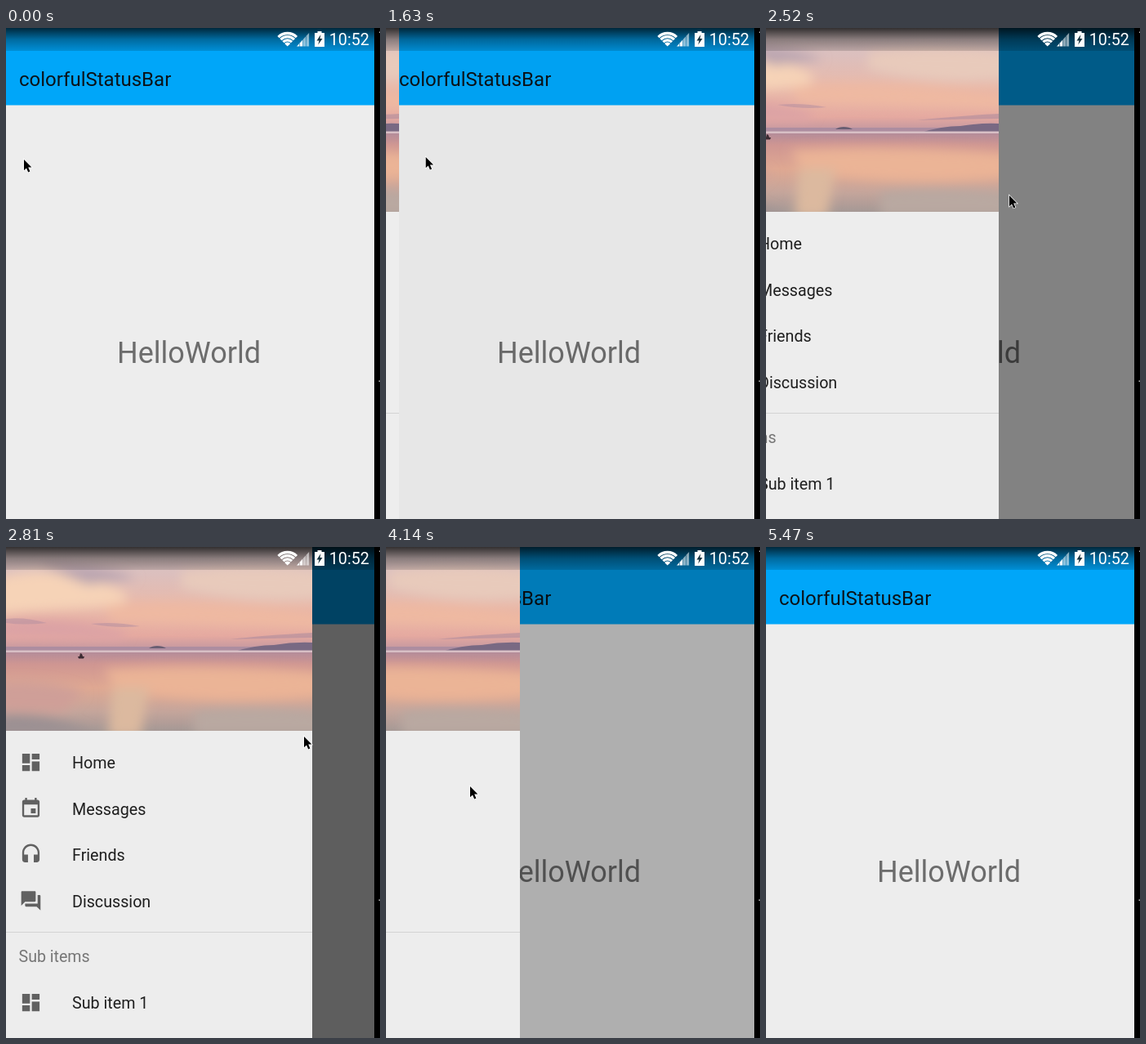
An HTML page that plays this animation: 458x601 px, repeating every 5660 ms.

```html
<!DOCTYPE html>
<html lang="en">
<head>
<meta charset="utf-8">
<title>Navigation drawer</title>
<style>
  html, body { margin: 0; width: 100%; height: 100%; overflow: hidden; background: #000; }
  svg { display: block; width: 100%; height: 100%; font-family: Roboto, "Noto Sans", sans-serif; }
</style>
</head>
<body>
<svg viewBox="0 0 458 601" xmlns="http://www.w3.org/2000/svg">
  <defs>
    <linearGradient id="status" x2="0" y2="1">
      <stop offset="0" stop-opacity=".76"/>
      <stop offset=".5" stop-opacity=".36"/>
      <stop offset="1" stop-opacity=".14"/>
    </linearGradient>
    <linearGradient id="sky" x2="0" y2="1">
      <stop offset="0" stop-color="#d5c5c7"/>
      <stop offset=".27" stop-color="#dcbfbd"/>
      <stop offset=".55" stop-color="#e8b9aa"/>
      <stop offset=".85" stop-color="#e5a9a0"/>
      <stop offset="1" stop-color="#bd94a0"/>
    </linearGradient>
    <linearGradient id="water" x2="0" y2="1">
      <stop offset="0" stop-color="#b48c99"/>
      <stop offset=".15" stop-color="#cf9692"/>
      <stop offset=".45" stop-color="#dfa892"/>
      <stop offset=".75" stop-color="#c5a59b"/>
      <stop offset="1" stop-color="#a59895"/>
    </linearGradient>
    <filter id="soft" x="-30%" y="-60%" width="160%" height="220%"><feGaussianBlur stdDeviation="7"/></filter>
    <clipPath id="photoClip"><rect width="375" height="225"/></clipPath>
    <clipPath id="screenClip"><rect width="451" height="601"/></clipPath>
    <path id="dashboard" d="M3 13h8V3H3zM3 21h8v-6H3zM13 21h8V11h-8zM13 3v6h8V3z"/>
    <path id="calendar" d="M17 12h-5v5h5zM16 1v2H8V1H6v2H5c-1.1 0-2 .9-2 2v14c0 1.1.9 2 2 2h14c1.1 0 2-.9 2-2V5c0-1.1-.9-2-2-2h-1V1zm3 18H5V8h14z"/>
    <path id="headset" d="M12 1c-5 0-9 4-9 9v7c0 1.7 1.3 3 3 3h3v-8H5v-2c0-3.9 3.1-7 7-7s7 3.1 7 7v2h-4v8h3c1.7 0 3-1.3 3-3v-7c0-5-4-9-9-9z"/>
    <path id="chat" d="M21 6h-2v9H6v2c0 .6.4 1 1 1h11l4 4V7c0-.6-.4-1-1-1zm-4 6V3c0-.6-.4-1-1-1H3c-.6 0-1 .4-1 1v14l4-4h10c.6 0 1-.4 1-1z"/>
  </defs>

  <g clip-path="url(#screenClip)">
    <rect width="451" height="601" fill="#ededed"/>
    <rect width="451" height="94.5" fill="#00a6f9"/>
    <text x="16" y="71" font-size="24" fill="#0b1319">colorfulStatusBar</text>
    <text x="136" y="410" font-size="36" fill="#6c6c6c">HelloWorld</text>
    <rect id="scrim" width="451" height="601"/>

    <g id="drawer">
      <rect width="375" height="601" fill="#ededed"/>
      <g clip-path="url(#photoClip)">
        <rect width="375" height="128" fill="url(#sky)"/>
        <g filter="url(#soft)">
          <path d="M-10 38Q50 20 120 45T90 75-10 84z" fill="#f6d3b7"/>
          <path d="M40 22Q120 20 160 38L100 46z" fill="#b9a4b0"/>
          <path d="M215 30Q300 20 390 30V62Q300 72 215 50z" fill="#e8cabb"/>
          <path d="M120 72Q240 64 390 82V100Q240 94 130 92z" fill="#efb9a1"/>
          <path d="M-10 92Q60 82 150 104L140 114-10 110z" fill="#dba2a5"/>
        </g>
        <path d="M0 88q22-3 50 5q-28 3-50 0zM104 94q30-3 60 3q-30 3-60-3z" fill="#b790a0" opacity=".55"/>
        <path d="M275 113q40-5 100-8v6q-55 1-100 2z" fill="#b08d9d" opacity=".6"/>
        <rect y="122" width="375" height="7" fill="#ad8da0"/>
        <path d="M280 128q25-8 48-8q24-4 47-3v12z" fill="#796983"/>
        <path d="M175 124q4-3 10-3q7 0 11 3z" fill="#695e72"/>
        <rect y="129" width="375" height="96" fill="url(#water)"/>
        <g filter="url(#soft)">
          <path d="M120 150Q250 142 390 155V182Q260 196 135 176z" fill="#ebb496"/>
          <path d="M130 172h45l-10 60h-40z" fill="#dcb99f"/>
          <path d="M-10 165Q50 160 95 178L70 202-10 200z" fill="#cf9f98"/>
          <path d="M-10 207Q50 200 110 230H-10z" fill="#9b9093"/>
          <path d="M230 202Q300 192 390 204V230H230z" fill="#b9a9a1"/>
        </g>
        <rect y="126.500" width="375" height="2.500" fill="#d8bfc5"/>
        <path d="M88 134h8l-1 2.500h-6zM90 134l1-4 2 1 1 3z" fill="#3b2b32"/>
      </g>
      <rect y="471" width="375" height="1" fill="#d3d3d3"/>
      <text x="15.500" y="508" font-size="19.600" fill="#767676">Sub items</text>
      <g id="items" font-size="19.700"></g>
    </g>

    <rect width="451" height="28" fill="url(#status)"/>
    <g fill="#fff">
      <g id="wifi" fill="none" stroke="#fff" stroke-width="3.300"></g>
      <g id="signal"></g>
      <path d="M381.500 4h5v2h3.500v17h-12V6h3.500z"/>
      <path d="M385.500 8l-5 7.500h3l-1.300 5 5.300-7.500h-3z" fill="#15323f"/>
      <text x="395.800" y="21" font-size="19.700">10:52</text>
    </g>
  </g>
  <path d="M456.500 431.500h1.500v1.500h-1.500zM457 4.500h1v1.500h-1z" fill="#bbb"/>
  <path id="cursor" d="M0 0V13.200L3 10.400 5.200 15.400 7.400 14.400 5.200 9.600H9.400z" stroke="#fff" stroke-width="1.400" paint-order="stroke"/>
</svg>

<script>
const LOOP = 5660, FIRST = 590, STEP = 147.9, DRAWER = 375;
const $ = id => document.getElementById(id);

const items = [
  ["dashboard", "Home", 264], ["calendar", "Messages", 320.5], ["headset", "Friends", 377],
  ["chat", "Discussion", 433.5], ["dashboard", "Sub item 1", 558]
];
$("items").innerHTML = items.map(([icon, label, y]) =>
  `<use href="#${icon}" transform="translate(16.300 ${y - 14.6}) scale(1.18)" fill="#616161"/>
   <text x="81" y="${y + 7}" fill="#1f1f1f">${label}</text>`).join("");

$("wifi").innerHTML = [16, 11.8, 7.6, 3.4].map(r => {
  const dx = r * .7, y = 22.5 - r * .714;
  return `<path d="M${344.7 - dx} ${y}A${r} ${r} 0 0 1 ${344.7 + dx} ${y}"/>`;
}).join("") + '<path d="M344.700 22.500l-2.500-2.800h5z" fill="#fff" stroke="none"/>';

$("signal").innerHTML = [0, 1, 2, 3].map(i => {
  const x = 356 + i * 3.9, top = n => 22.5 - n * 1.1;
  return `<path d="M${x} 22.500V${top(i * 3.9)}L${x + 3.4} ${top(i * 3.9 + 3.4)}V22.500z" opacity="${i < 2 ? .95 : .55}"/>`;
}).join("");

// Keys: [step, value...]
const drawerKeys = [[6, 0], [7, 16], [9, 58], [11, 139], [13, 285], [14, 350], [15, 375],
  [19, 375], [20, 362], [21, 311], [24, 164], [25, 90], [26, 28], [27, 0]];
const cursorKeys = [[-1, 22, 161], [1, 13, 160], [4, 3, 158.5], [6, 3, 158.5], [7, 48.7, 158],
  [9, 108, 164], [11, 192, 173], [13, 298, 205], [15, 365, 232], [18, 362, 280],
  [20, 295, 293], [21, 237, 293], [24, 103, 293], [25, 58, 294], [26, 50, 302],
  [28, 200, 415], [30, 382, 542], [31, 396, 566], [32, 409, 591]];

function sample(keys, step) {
  const next = keys.findIndex(key => key[0] >= step);
  if (next < 0) return keys[keys.length - 1].slice(1);
  if (next === 0) return keys[0].slice(1);
  const a = keys[next - 1], b = keys[next];
  const p = (step - a[0]) / (b[0] - a[0]);
  return a.slice(1).map((v, i) => v + (b[i + 1] - v) * p);
}

function draw(time) {
  const step = Math.max(-1, Math.floor((time - FIRST + 4) / STEP));
  const edge = Math.round(sample(drawerKeys, step)[0]);
  const [x, y] = sample(cursorKeys, step);
  $("drawer").setAttribute("transform", `translate(${edge - DRAWER} 0)`);
  $("scrim").setAttribute("opacity", .6 * edge / DRAWER);
  $("cursor").setAttribute("transform", `translate(${x} ${y})`);
  $("cursor").setAttribute("visibility", step > 32 ? "hidden" : "visible");
}

const start = performance.now();
function tick() {
  draw((performance.now() - start) % LOOP);
  requestAnimationFrame(tick);
}
tick();
</script>
</body>
</html>
```
